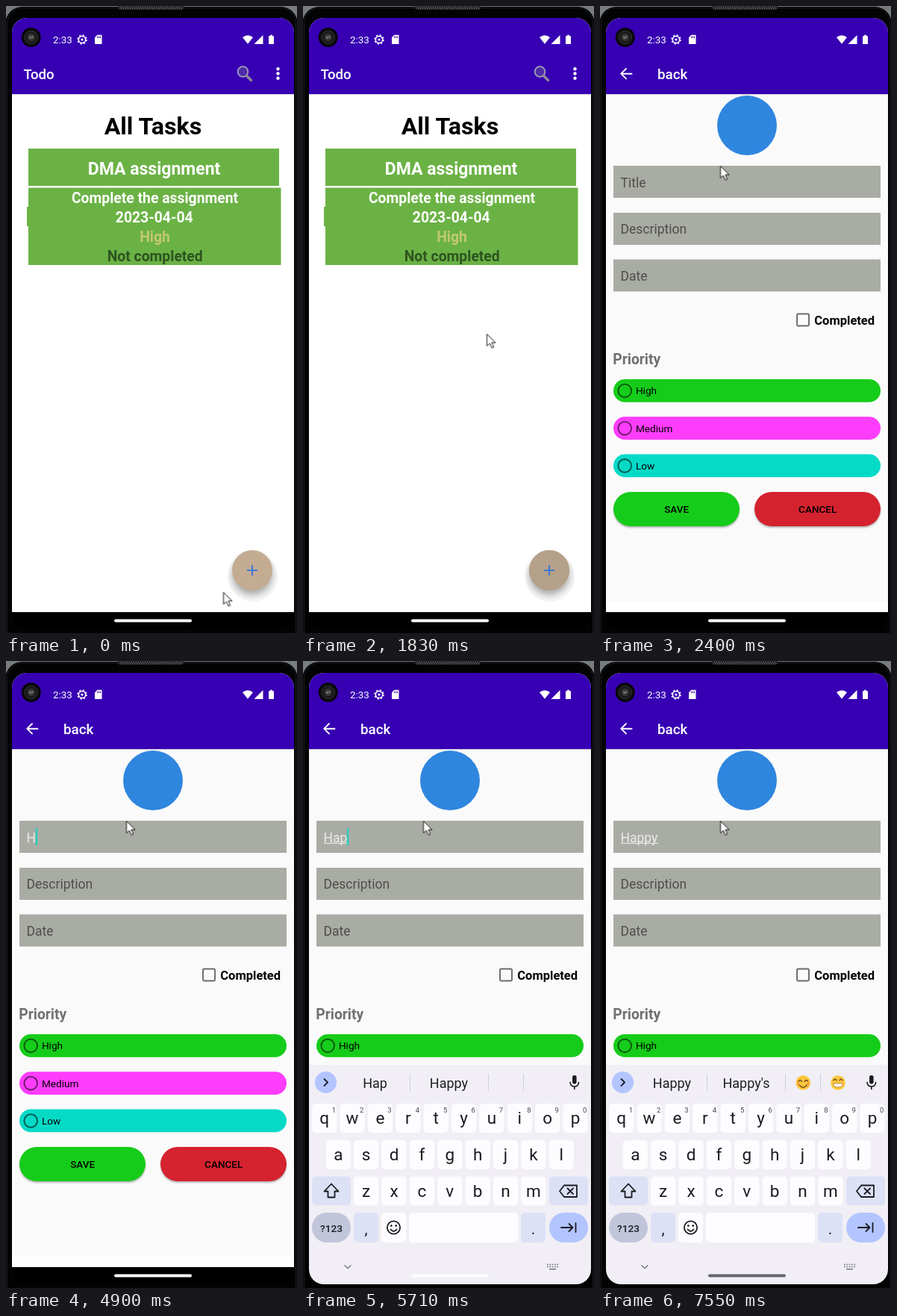
An HTML page for the animation above (8 s loop, 390 px wide and 840 px high).

```html
<!DOCTYPE html>
<html lang="en">
<head>
<meta charset="utf-8">
<title>Todo app</title>
<style>
html, body { margin: 0; width: 100%; height: 100%; overflow: hidden; background: #000; }
svg { display: block; width: 390px; height: 840px; font-family: Roboto, "Noto Sans", sans-serif; }
.bold { font-weight: 700; }
.medium { font-weight: 500; }
.mid { text-anchor: middle; }
.line { fill: none; stroke-linecap: round; stroke-linejoin: round; }
.field { fill: #a9aca4; }
.hint { fill: #4d4e4a; font-size: 17.5px; }
.typed { fill: #ececea; font-size: 17.5px; }
.note { font-size: 19.35px; }
.word { fill: #1d1d22; font-size: 18px; text-anchor: middle; }

/* Every change is a hard step on one 8 s clock */
.anim { animation: 8s step-end infinite; }
#cursor { animation-name: cursor; }
#list { animation-name: list; }
#form { animation-name: form; }
#press { animation-name: press; }
#title { animation-name: title; }
#t1 { animation-name: t1; }
#t2 { animation-name: t2; }
#t3 { animation-name: t3; }
#t4 { animation-name: t4; }
#t5 { animation-name: t5; }
#line { animation-name: line; }
#caret { animation-name: caret; }
#keys { animation-name: keys; }
#s3 { animation-name: s3; }
#s4 { animation-name: s4; }
#s5 { animation-name: s5; }
#faces { animation-name: faces; }
#pill { animation-name: pill; }

@keyframes cursor {
  0% { transform: translate(291.5px, 785.5px); }
  5.5% { transform: translate(291.5px, 784.5px); }
  7.375% { transform: translate(315.5px, 764.5px); }
  9.25% { transform: translate(334.5px, 754.5px); }
  18% { transform: translate(360.5px, 704.5px); }
  19.875% { transform: translate(354.5px, 590.5px); }
  21.375% { transform: translate(300.5px, 508.5px); }
  22.875% { transform: translate(246.5px, 439.5px); }
  24.375% { transform: translate(237.5px, 404.5px); }
  26.25% { transform: translate(213.5px, 322.5px); }
  28.125% { transform: translate(192.5px, 244.5px); }
  30%, 100% { transform: translate(161.5px, 214.5px); }
}
@keyframes list {
  0% { transform: none; opacity: 1; }
  24.375% { transform: translateX(-30px); }
  26.25%, 100% { transform: translateX(-37px); opacity: 0; }
}
@keyframes form {
  0% { opacity: 0; transform: translateX(38px); }
  24.375% { opacity: .8; transform: translateX(8px); }
  26.25% { opacity: 1; transform: translateX(1px); }
  28.125%, 100% { opacity: 1; transform: none; }
}
@keyframes press { 0% { opacity: 0; } 16.5% { opacity: .6; } 18% { opacity: 1; } 24.375%, 100% { opacity: .5; } }
@keyframes title { 0% { opacity: 1; } 61.25%, 100% { opacity: 0; } }
@keyframes t1 { 0% { opacity: 0; } 61.25% { opacity: 1; } 66.25%, 100% { opacity: 0; } }
@keyframes t2 { 0% { opacity: 0; } 66.25% { opacity: 1; } 67.75%, 100% { opacity: 0; } }
@keyframes t3 { 0% { opacity: 0; } 67.75% { opacity: 1; } 73.25%, 100% { opacity: 0; } }
@keyframes t4 { 0% { opacity: 0; } 73.25% { opacity: 1; } 86.125%, 100% { opacity: 0; } }
@keyframes t5 { 0% { opacity: 0; } 86.125%, 100% { opacity: 1; } }
@keyframes line {
  0% { width: 0; }
  71.375% { width: 32px; }
  74.75% { width: 41.6px; }
  89.5%, 100% { width: 49.8px; }
}
@keyframes caret {
  0% { opacity: 0; transform: none; }
  61.25% { opacity: 1; transform: translateX(12.3px); }
  66.25% { opacity: 1; transform: translateX(21.8px); }
  67.75% { opacity: 1; transform: translateX(31.4px); }
  73.25% { opacity: 1; transform: translateX(41.4px); }
  81.125% { opacity: 0; transform: translateX(41.4px); }
  82.625% { opacity: 1; transform: translateX(41.4px); }
  86.125% { opacity: 1; transform: translateX(49.7px); }
  92.875%, 100% { opacity: 0; transform: translateX(49.7px); }
}
@keyframes keys {
  0% { opacity: 0; transform: translateY(294px); }
  66.25% { opacity: 1; transform: translateY(90px); }
  67.75% { opacity: 1; transform: translateY(5px); }
  71.375%, 100% { opacity: 1; transform: none; }
}
@keyframes s3 { 0% { opacity: 0; } 71.375% { opacity: 1; } 74.75%, 100% { opacity: 0; } }
@keyframes s4 { 0% { opacity: 0; } 74.75% { opacity: 1; } 89.5%, 100% { opacity: 0; } }
@keyframes s5 { 0% { opacity: 0; } 89.5%, 100% { opacity: 1; } }
@keyframes faces { 0% { opacity: 0; } 76.25%, 100% { opacity: 1; } }
@keyframes pill {
  0% { fill: #fcfcfc; }
  74.75% { fill: #e0e0e3; }
  76.25% { fill: #b4b4b9; }
  78.125% { fill: #85858b; }
  81.125%, 100% { fill: #67666c; }
}
</style>
</head>
<body>
<svg viewBox="0 0 390 840" xmlns="http://www.w3.org/2000/svg">
  <defs>
    <clipPath id="screen"><rect x="8" y="16" width="378" height="819" rx="20"/></clipPath>
    <clipPath id="app"><rect x="8" y="70" width="378" height="742"/></clipPath>
    <filter id="soft" x="-50%" y="-50%" width="200%" height="200%"><feGaussianBlur stdDeviation="4"/></filter>
    <filter id="edge" x="-10%" y="-20%" width="120%" height="150%"><feGaussianBlur stdDeviation="1.2"/></filter>
  </defs>

  <!-- phone body -->
  <rect width="390" height="840" fill="#777c80"/>
  <rect x="-.5" y="1" width="391" height="900" rx="22" fill="#030303"/>
  <rect x="1.5" y="2.5" width="387" height="900" rx="21" fill="none" stroke="#1c1d1e"/>
  <rect x="150" y="-3" width="88" height="8" rx="3" fill="#2a2a2a"/>
  <path d="M153 1.5H236M154 3.5H236" stroke="#777" stroke-dasharray="1 2"/>

  <g clip-path="url(#screen)">
    <rect x="8" y="16" width="378" height="819" fill="#000"/>
    <rect x="8" y="16" width="378" height="796" fill="#fff"/>
    <rect x="8" y="16" width="378" height="102" fill="#3700b3"/>

    <g clip-path="url(#app)">
      <!-- task list -->
      <g id="list" class="anim">
        <text class="medium" x="23.6" y="98" font-size="18.6" fill="#fff">Todo</text>
        <g class="line">
          <circle cx="317.5" cy="88" r="6.8" stroke="#a99fbb" stroke-width="1.8" fill="#4c2ca8"/>
          <path d="M322.5 93.5L328.5 99.5" stroke="#8f8799" stroke-width="3.4"/>
        </g>
        <g fill="#fff"><circle cx="364.5" cy="84.2" r="2.2"/><circle cx="364.5" cy="90.5" r="2.2"/><circle cx="364.5" cy="96.8" r="2.2"/></g>
        <text class="bold mid" x="197" y="172" font-size="32.2">All Tasks</text>
        <g fill="#6bb245">
          <rect x="30" y="191" width="336" height="50"/>
          <rect x="30" y="243.5" width="338.5" height="103.5"/>
          <rect x="28" y="269" width="3" height="26"/>
        </g>
        <g class="bold mid" fill="#fff">
          <text x="198.5" y="226" font-size="23">DMA assignment</text>
          <g class="note">
            <text x="199.5" y="264">Complete the assignment</text>
            <text x="198.7" y="290">2023-04-04</text>
            <text x="199.5" y="316" fill="#c3c96e">High</text>
            <text x="199.7" y="342" fill="#2d5420">Not completed</text>
          </g>
        </g>
        <circle cx="331" cy="765" r="33" fill="#f5f5f5"/>
        <circle cx="330" cy="762" r="27" fill="#000" opacity=".3" filter="url(#soft)"/>
        <circle cx="330" cy="756" r="27" fill="#c3ac92"/>
        <circle id="press" class="anim" cx="330" cy="756" r="27" fill="#b5a189"/>
        <path d="M323 756H337M330 749V763" stroke="#3f78d6" stroke-width="2"/>
      </g>

      <!-- task form -->
      <g id="form" class="anim">
        <rect x="-32" y="70" width="460" height="48" fill="#3700b3"/>
        <rect x="-32" y="118" width="460" height="680" fill="#fafafa"/>
        <path class="line" d="M42.5 90.7H28.5M35 84L28.3 90.7L35 97.4" stroke="#fff" stroke-width="1.9"/>
        <text class="medium" x="77" y="98" font-size="18.8" fill="#fff">back</text>
        <circle cx="197" cy="160" r="40" fill="#2f86df"/>
        <rect class="field" x="18" y="214" width="358" height="43"/>
        <rect class="field" x="18" y="277" width="358" height="43"/>
        <rect class="field" x="18" y="339.5" width="358" height="43"/>
        <g class="hint">
          <text id="title" class="anim" x="27.5" y="242.5">Title</text>
          <text x="27.5" y="305">Description</text>
          <text x="27.5" y="367.7">Date</text>
        </g>
        <g class="typed">
          <text id="t1" class="anim" x="27.5" y="242.5">H</text>
          <text id="t2" class="anim" x="27.5" y="242.5">Ha</text>
          <text id="t3" class="anim" x="27.5" y="242.5">Hap</text>
          <text id="t4" class="anim" x="27.5" y="242.5">Happ</text>
          <text id="t5" class="anim" x="27.5" y="242.5">Happy</text>
          <rect id="line" class="anim" x="27.8" y="243.7" width="0" height="1.1"/>
        </g>
        <rect id="caret" class="anim" x="27.7" y="224" width="1.9" height="23" fill="#03dac5"/>
        <rect x="264" y="412.5" width="16" height="16" rx="1.5" fill="none" stroke="#6b6b6b" stroke-width="1.9"/>
        <text class="bold" x="287.3" y="427" font-size="16.5">Completed</text>
        <text class="bold" x="17.3" y="480" font-size="19.3" fill="#707070">Priority</text>
        <g id="radios" font-size="13.6"></g>
        <g id="buttons" class="medium mid" font-size="13.5"></g>
      </g>
    </g>

    <rect x="8" y="118" width="378" height="1.4" fill="#000" opacity=".1"/>

    <!-- status bar -->
    <text x="63" y="50" font-size="13.4" fill="#fff">2:33</text>
    <g fill="none" stroke="#fff">
      <circle cx="102" cy="45" r="4.6" stroke-width="1.5"/>
      <circle cx="102" cy="45" r="5.9" stroke-width="1.6" stroke-dasharray="2.3 2.33"/>
    </g>
    <circle cx="102" cy="45" r="1.6" fill="#fff"/>
    <path d="M122.3 38.8H128.5V51H119V42.2Z" fill="#fff"/>
    <path d="M122.5 40.5V43M124.5 40.5V43M126.5 40.5V43" stroke="#3700b3"/>
    <g fill="#fff">
      <path d="M317 42Q324 36.5 331 42L324 50.8Z"/>
      <path d="M344.5 39V51H332.5Z"/>
      <path d="M352 40.2H354V38.8H357V40.2H359V51H352Z"/>
    </g>

    <rect x="145" y="821.5" width="104" height="4" rx="2" fill="#fcfcfc"/>

    <!-- keyboard -->
    <g id="keys" class="anim">
      <rect x="8" y="541" width="378" height="380" fill="#f1eff5"/>
      <circle cx="30.5" cy="564.5" r="14.6" fill="#b3c5ff"/>
      <path class="line" d="M28.5 560L33 564.5L28.5 569" stroke="#1b1d2c" stroke-width="1.8"/>
      <path d="M143.5 553V576M248.5 553V576M295.5 553V576" stroke="#d0ced8"/>
      <g id="s3" class="anim"><text class="word" x="96.5" y="572">Hap</text><text class="word" x="195.5" y="572">Happy</text></g>
      <g id="s4" class="anim"><text class="word" x="96.5" y="572">Happ</text><text class="word" x="195.5" y="572">Happy</text></g>
      <g id="s5" class="anim"><text class="word" x="96.5" y="572">Happy</text><text class="word" x="196" y="572">Happy's</text></g>
      <g id="faces" class="anim">
        <circle cx="272.3" cy="565" r="9.8" fill="#fcc73a"/>
        <path class="line" d="M265.8 563.5Q268.3 559.5 270.5 563.5M274 563.5Q276.3 559.5 278.8 563.5M267 568Q272.3 574.5 277.6 568" stroke="#6b4420" stroke-width="1.3"/>
        <circle cx="266" cy="567" r="2" fill="#f58c54" opacity=".7"/><circle cx="278.6" cy="567" r="2" fill="#f58c54" opacity=".7"/>
        <circle cx="319" cy="565" r="9.8" fill="#fcc73a"/>
        <path class="line" d="M313 562Q315 558.5 317 562M321 562Q323 558.5 325 562" stroke="#6b4420" stroke-width="1.3"/>
        <path d="M312.5 566H325.5Q325 571 319 571Q313 571 312.5 566Z" fill="#fff" stroke="#a06a28" stroke-width=".7"/>
      </g>
      <rect x="361" y="555" width="5.6" height="11.5" rx="2.8" fill="#1b1b20"/>
      <path class="line" d="M358 564.5Q358.5 570 363.8 570Q369.1 570 369.6 564.5M363.8 570V573.3" stroke="#1b1b20" stroke-width="1.7"/>
      <g id="caps" class="mid" fill="#1b1b20"></g>
      <g class="line" stroke="#1b1b20" stroke-width="1.8">
        <path d="M38 700.5L47.5 710.5H42.5V718.5H33.5V710.5H28.5Z"/>
        <path d="M344 710.3L350 702.5H367V718H350ZM354.5 706.5L362 714M362 706.5L354.5 714"/>
        <circle cx="121.5" cy="759" r="8.6"/>
        <path d="M117.5 761.5Q121.5 766.5 125.5 761.5"/>
        <path d="M346 759H361M356.5 754L361.5 759L356.5 764M365.5 753V765"/>
        <path d="M56 809.8L60 813.8L64 809.8" stroke="#77767d" stroke-width="1.4"/>
      </g>
      <circle cx="118.3" cy="756.5" r="1.3"/><circle cx="124.7" cy="756.5" r="1.3"/>
      <path d="M327 808.5H342M327 811.5H342" stroke="#77767d" stroke-width="1.7" stroke-dasharray="1.8 1.5"/>
      <path d="M330 814.7H339" stroke="#77767d" stroke-width="1.5"/>
      <rect id="pill" class="anim" x="145" y="821.5" width="104" height="4" rx="2" fill="#fcfcfc"/>
    </g>
  </g>

  <!-- camera -->
  <circle cx="33.7" cy="42" r="13" fill="#080808"/>
  <circle cx="33.7" cy="42" r="9" fill="#1c1b1c" stroke="#323032"/>
  <circle cx="33.7" cy="42" r="4.8" fill="#3b3937"/>
  <path d="M31.5 41L33.5 43.5M34.5 40.5L36 42.5" stroke="#99938a" stroke-width="1.3"/>

  <path id="cursor" class="anim" d="M0 0V16L3.8 12.6L6.6 18.6L9.2 17.5L6.5 11.6H11.5Z" fill="#fff" stroke="#111"/>
</svg>
<script>
const $ = id => document.getElementById(id);
const rect = (x, y, w, h, rx, fill, more = '') =>
  `<rect x="${x}" y="${y}" width="${w}" height="${h}" rx="${rx}" fill="${fill}" ${more}/>`;
const text = (x, y, s, more = '') => `<text x="${x}" y="${y}" ${more}>${s}</text>`;

$('radios').innerHTML = [['High', '#16cc1a'], ['Medium', '#fd3dfb'], ['Low', '#05dac7']].map(([name, color], i) => {
  const y = 500 + i * 50.3;
  return rect(18, y, 358, 30.7, 15.3, color) +
    `<circle cx="33.2" cy="${y + 15.4}" r="8.8" fill="none" stroke="#000" stroke-opacity=".58" stroke-width="1.9"/>` +
    text(47.9, y + 20.3, name);
}).join('');

$('buttons').innerHTML = [[18, 'SAVE', '#16cc1a'], [207, 'CANCEL', '#d5222f']].map(([x, name, color]) =>
  rect(x, 653, 169, 46, 23, '#000', 'opacity=".28" filter="url(#edge)"') +
  rect(x, 651, 169, 46, 23, color) + text(x + 84.7, 679, name)).join('');

const pitch = 37.37, white = '#fdfcfe', tint = '#dde1f6';
let caps = '';
[['qwertyuiop', 28.7, 593], ['asdfghjkl', 47.3, 642], ['zxcvbnm', 84.7, 690.5]].forEach(([row, x0, y], r) => {
  [...row].forEach((c, i) => {
    const x = x0 + i * pitch;
    caps += rect(x - 16.6, y, 33.2, 39, 5, white) + text(x, y + 27, c, 'font-size="22.5"');
    if (!r) caps += text(x + 12.6, y + 11.5, (i + 1) % 10, 'font-size="9.5" fill="#45454c"');
  });
});
caps += rect(12, 690.5, 52, 39, 5, tint) + rect(330, 690.5, 52, 39, 5, tint) +
  rect(12, 739, 52, 40, 20, '#c0c5da') + rect(330, 739, 52, 40, 20, '#b3c5ff') +
  rect(68, 739, 33, 40, 5, tint) + rect(105, 739, 33, 40, 5, white) +
  rect(142, 739, 146, 40, 5, white) + rect(292, 739, 33, 40, 5, tint) +
  text(38, 764.5, '?123', 'font-size="13.6" class="medium"') +
  text(84.5, 767.5, ',', 'font-size="21"') + text(308.5, 767.5, '.', 'font-size="21"');
$('caps').innerHTML = caps;
</script>
</body>
</html>
```
